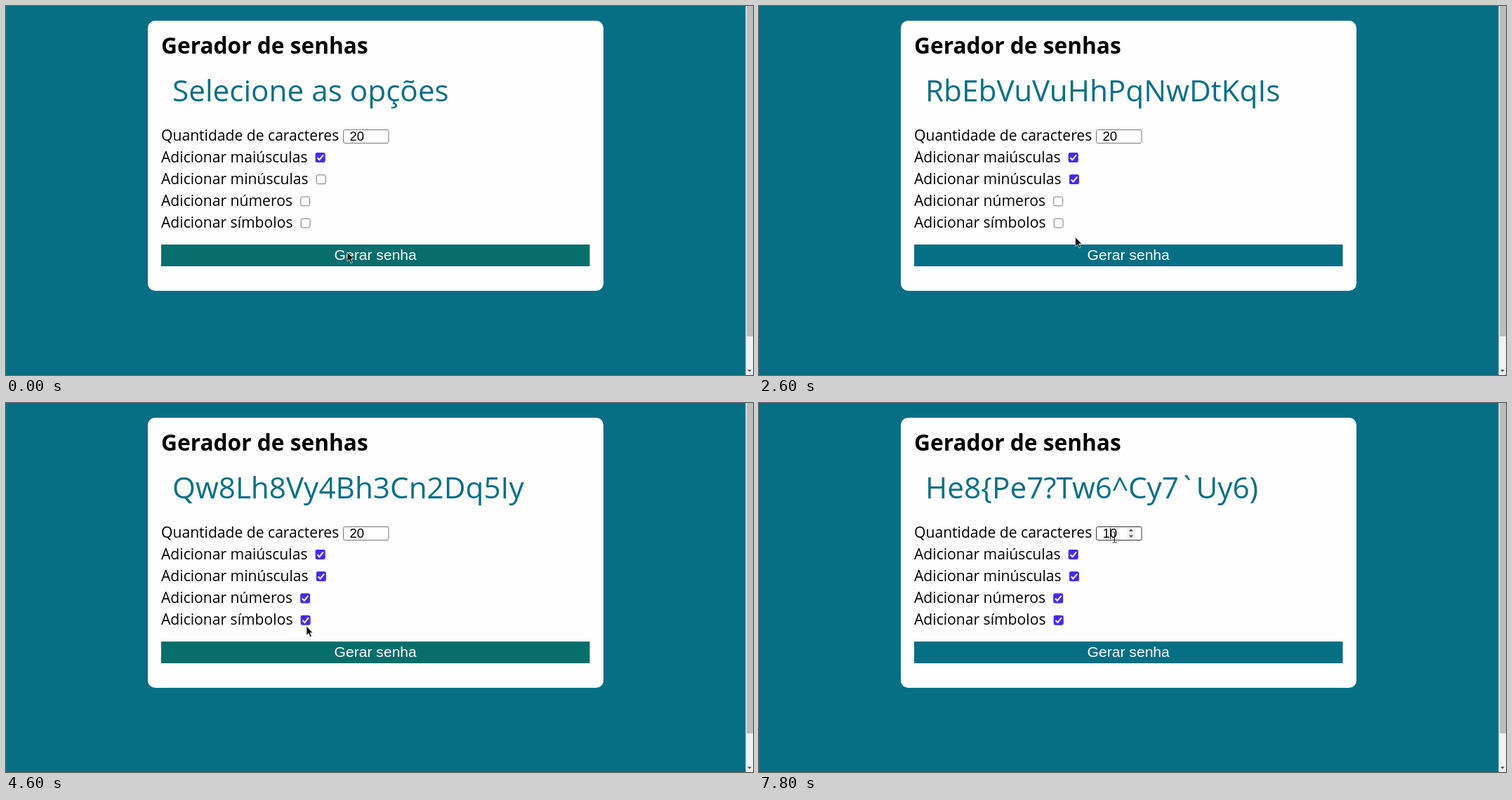
Write an HTML page that moves like this. It is 1064 px wide and 526 px high and loops after 8000 ms.

```html
<!DOCTYPE html>
<html lang="pt">
<head>
<meta charset="utf-8">
<title>Gerador de senhas</title>
<style>
  html, body { margin: 0; width: 100%; height: 100%; overflow: hidden; background: #066f84; }
  svg { display: block; font-size: 21.125px; }
  text { font-family: "Open Sans", sans-serif; white-space: pre; }
  .ui { font-family: "Liberation Sans", Arial, sans-serif; }
  #title { font-size: 1.5em; font-weight: 700; }
  #result { font-size: 2em; fill: #066f84; }
  #amount { font-size: 18.6px; }
</style>
</head>
<body>
<svg width="1064" height="526" viewBox="0 0 1064 526">
  <rect width="1064" height="526" fill="#066f84"/>
  <rect x="1053.5" width="10.5" height="526" fill="#f1f1f1"/>
  <rect x="1055" width="9" height="471" fill="#bcbcbc"/>
  <path d="M1056 518.5h6l-3 3.2z" fill="#505050"/>
  <rect x="202" y="21" width="649" height="385" rx="10.6" fill="#fefefe"/>
  <text id="title" x="221" y="67.6">Gerador de senhas</text>
  <text id="result" x="237" y="136"></text>
  <text x="221" y="191.8">Quantidade de caracteres</text>
  <rect id="field" x="480.5" y="176.5" width="64.5" height="19" rx="2" fill="#fff"/>
  <text id="amount" class="ui" x="489.5" y="192"></text>
  <g id="spinner">
    <rect x="524" y="178" width="12" height="16" fill="#efefef"/>
    <path d="M527 183l3-3.4 3 3.4zM527 188.6l3 3.4 3-3.4z" fill="#505050"/>
  </g>
  <rect id="caret" y="178" width="1" height="16"/>
  <g id="rows"></g>
  <rect id="button" x="221" y="340" width="610.5" height="31"/>
  <text class="ui" x="526.2" y="362.4" text-anchor="middle" fill="#fff">Gerar senha</text>
  <path id="arrow" d="M0 0V13.2L3 10.5 5.2 15.6 7.4 14.6 5.2 9.7H9.2Z" fill="#111" stroke="#e8e8e8" stroke-width=".8"/>
  <path id="beam" d="M-3 -7.5H-1L0 -6.5 1 -7.5H3M0 -6.5V6.5M-3 7.5H-1L0 6.5 1 7.5H3" fill="none" stroke="#222"/>
</svg>
<script>
const LOOP = 8000, STEP = 100, BUTTON_TOP = 340;
const $ = id => document.getElementById(id);

// what each checkbox adds, and when it gets ticked
const options = [
  { name: 'maiúsculas', time: 0 },
  { name: 'minúsculas', time: 1600 },
  { name: 'números', time: 3100 },
  { name: 'símbolos', time: 4500 }
];
const results = [
  { time: 0, text: 'Selecione as opções' },
  { time: 500, text: 'MVDDWWSJYJTLTHIFQXGG' },
  { time: 2400, text: 'RbEbVuVuHhPqNwDtKqIs' },
  { time: 3900, text: 'Qw8Lh8Vy4Bh3Cn2Dq5Iy' },
  { time: 4900, text: 'He8{Pe7?Tw6^Cy7`Uy6)' }
];
const edits = [
  { time: 0, text: '20' },
  { time: 6300, text: '20', caret: 500 },
  { time: 6600, text: '20' },
  { time: 7100, text: '0', caret: 490 },
  { time: 7700, text: '10', caret: 500 }
];

// pointer rests: arrival, departure, x, y
const stops = [
  [0, 600, 486, 351],
  [1200, 1700, 448, 243],
  [1900, 2200, 464, 338],
  [2300, 2500, 460, 351],
  [3000, 3100, 427, 275],
  [3300, 3600, 438, 337],
  [3700, 4000, 438, 343],
  [4400, 4600, 428, 318],
  [4700, 5100, 430, 345],
  [6000, 7700, 502, 186],
  [7800, LOOP, 506.5, 191.5]
];

$('rows').innerHTML = options.map(({ name }, i) => `
  <g transform="translate(221 ${222.7 + 31.2 * i})">
    <text>Adicionar ${name}</text>
    <g class="box">
      <rect x=".5" y=".5" width="12.8" height="12.8" rx="2.2" fill="#fff" stroke="#767676"/>
      <g class="tick">
        <rect width="13.8" height="13.8" rx="2.2" fill="#4629f4"/>
        <path d="M2.7 7.2L5.6 10.2 11.2 3.3" fill="none" stroke="#fff" stroke-width="2"/>
      </g>
    </g>
  </g>`).join('');
for (const box of document.querySelectorAll('.box')) {
  const width = box.previousElementSibling.getComputedTextLength();
  box.setAttribute('transform', `translate(${width + 11.3} -13.6)`);
}
const ticks = document.querySelectorAll('.tick');

const latest = (list, t) => list.filter(item => item.time <= t).pop();
const show = (el, on) => el.setAttribute('visibility', on ? 'visible' : 'hidden');
const easeOut = k => 1 - (1 - k) ** 1.5;

function pointer(t) {
  const i = stops.findLastIndex(([arrive]) => arrive <= t);
  const [, leave, x, y] = stops[i];
  if (t <= leave || i === stops.length - 1) return [x, y];
  const [arrive, , nextX, nextY] = stops[i + 1];
  const k = easeOut((t - leave) / (arrive - leave));
  return [x + (nextX - x) * k, y + (nextY - y) * k];
}

function draw(t) {
  const overButton = [t, t + STEP].some(time => pointer(time)[1] >= BUTTON_TOP);
  const { text, caret } = latest(edits, t);
  const inField = t >= 6000, typing = t >= 7100 && t < 7800;

  $('result').textContent = latest(results, t).text;
  $('amount').textContent = text;
  $('button').setAttribute('fill', overButton ? '#076e6b' : '#066f84');
  $('field').setAttribute('stroke', t >= 6100 ? '#333' : '#767676');
  $('caret').setAttribute('x', caret || 0);
  show($('caret'), caret);
  show($('spinner'), inField);
  ticks.forEach((el, i) => show(el, t >= options[i].time));

  for (const id of ['arrow', 'beam']) $(id).setAttribute('transform', `translate(${pointer(t)})`);
  show($('arrow'), !inField);
  show($('beam'), inField && !typing);
}

const start = performance.now();
function tick() {
  const t = (performance.now() - start) % LOOP;
  draw(Math.floor(t / STEP) * STEP);
  requestAnimationFrame(tick);
}
tick();
</script>
</body>
</html>
```
